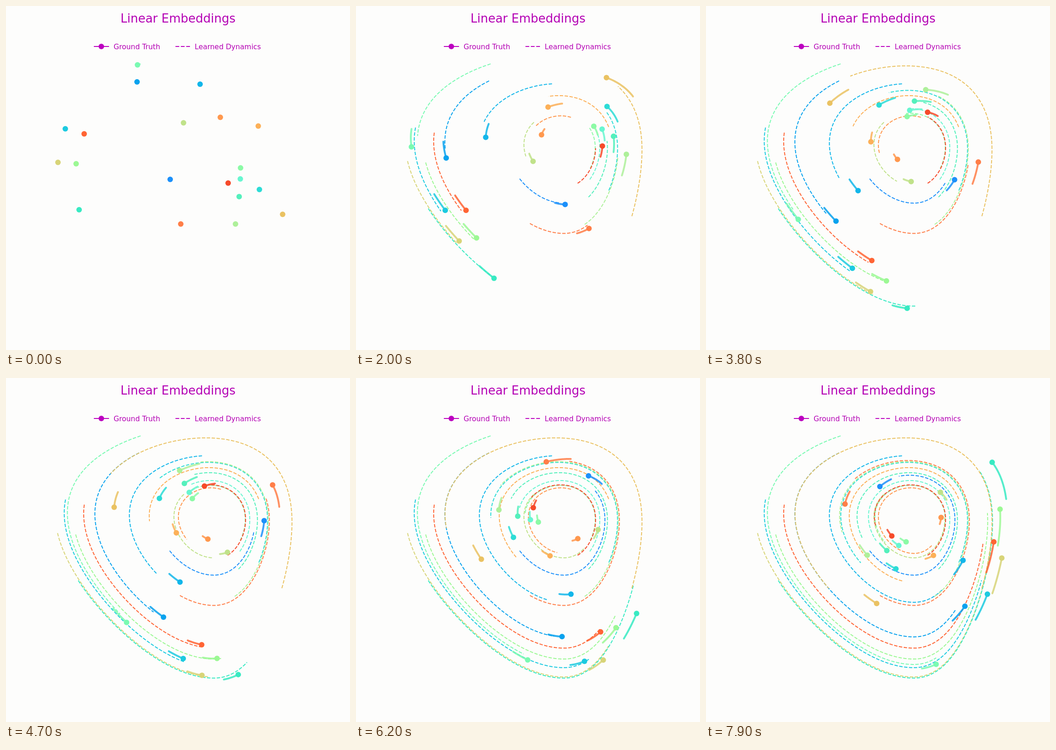
An HTML page with a canvas for the animation above (8000 ms loop, 748 by 748 pixels).

```html
<!DOCTYPE html>
<html lang="en">
<head>
<meta charset="utf-8">
<title>Linear Embeddings</title>
<style>
  html, body { margin: 0; width: 100%; height: 100%; overflow: hidden; background: #fdfdfc; }
  canvas, svg { position: absolute; left: 0; top: 0; width: 748px; height: 748px; }
  text { font-family: "DejaVu Sans", Verdana, sans-serif; font-size: 15.5px; fill: #b400b4; }
  .title { font-size: 26px; text-anchor: middle; }
  .key { stroke: #bc00c0; stroke-width: 2.2; }
</style>
</head>
<body>
<canvas id="stage" width="748" height="748"></canvas>
<svg viewBox="0 0 748 748">
  <text class="title" x="374" y="35.5">Linear Embeddings</text>
  <path class="key" d="M191 88H224"/>
  <circle cx="207.3" cy="88" r="6" fill="#bc00c0"/>
  <text x="234" y="93.5">Ground Truth</text>
  <path class="key" d="M368.5 88H400" stroke-dasharray="8.2 3.5"/>
  <text x="410.3" y="93.5">Learned Dynamics</text>
</svg>
<script>
const LOOP = 8000, FRAME = 100;
const H = 0.01;      // integration step, s
const LEAD = 0.03;   // motion already done at time 0, s
const TAIL = 0.42;   // trail length, s

// start x, start y, colour
const particles = [
  [286, 128, '#7afab2'], [285, 165, '#08a2ee'], [422, 170, '#12b6ea'],
  [129, 267, '#1ccae0'], [170, 278, '#ff6434'], [113, 340, '#d8d478'],
  [152.5, 343, '#9cf894'], [159, 443, '#38eac2'], [386, 254, '#c0e28a'],
  [466, 242, '#ff984e'], [548.5, 261, '#fcb058'], [510, 352, '#8cfaa6'],
  [509.5, 376, '#68f6d0'], [483, 385, '#f64a2a'], [551, 399, '#2cdcd6'],
  [507, 414.5, '#54f0bc'], [357, 377, '#1c90fa'], [380, 474, '#ff7e48'],
  [499, 474, '#aef09a'], [601.5, 453, '#eac262']
];

// Predator-prey flow in log coordinates, slightly damped
function truth(x, y) {
  return [
    80 * (1 - Math.exp((297 - y) / 125)) - 0.02 * (x - 458),
    108 * (1 - Math.exp((x - 462) / 175)) - 0.02 * (y - 297)
  ];
}

// The fitted flow: a weaker field, pulled inward at the lower right
function learned(x, y) {
  const u = x - 452, w = y - 305;
  const corner = Math.max(0, u) * Math.max(0, w);
  return [
    100 * (1 - Math.exp(-w / 185)) - 0.02 * u - 0.0006 * corner,
    117 * (1 - Math.exp(u / 210)) - 0.055 * Math.max(0, -w) - 0.001 * corner
  ];
}

function integrate(field, x, y) {
  const path = [[x, y]];
  for (let t = 0; t < LOOP / 1000 + LEAD; t += H) {
    const a = field(x, y);
    const b = field(x + a[0] * H / 2, y + a[1] * H / 2);
    x += b[0] * H;
    y += b[1] * H;
    path.push([x, y]);
  }
  return path;
}

const tracks = particles.map(([x, y, color]) => {
  const v = truth(x, y);
  const x0 = x - v[0] * LEAD, y0 = y - v[1] * LEAD;
  return { color, dot: integrate(truth, x0, y0), fit: integrate(learned, x0, y0) };
});

const ctx = document.getElementById('stage').getContext('2d');

function line(path, from, to) {
  ctx.beginPath();
  for (let i = from; i <= to; i++) ctx.lineTo(path[i][0], path[i][1]);
  ctx.stroke();
}

function draw(ms) {
  const now = Math.round((ms / 1000 + LEAD) / H);
  const tail = Math.max(0, now - Math.round(TAIL / H));
  ctx.clearRect(0, 0, 748, 748);

  ctx.lineWidth = 2;
  ctx.lineCap = 'butt';
  ctx.setLineDash([7.4, 3.2]);
  for (const p of tracks) {
    ctx.strokeStyle = p.color;
    line(p.fit, 0, now);
  }

  ctx.setLineDash([]);
  ctx.lineWidth = 4;
  ctx.lineCap = 'round';
  for (const p of tracks) {
    ctx.strokeStyle = ctx.fillStyle = p.color;
    ctx.globalAlpha = 0.85;
    if (now - tail > LEAD / H) line(p.dot, tail, now);
    ctx.globalAlpha = 1;
    ctx.beginPath();
    ctx.arc(p.dot[now][0], p.dot[now][1], 6, 0, 2 * Math.PI);
    ctx.fill();
  }
}

const begin = performance.now();
function tick() {
  const t = (performance.now() - begin) % LOOP;
  draw(Math.floor(t / FRAME) * FRAME);
  requestAnimationFrame(tick);
}
tick();
</script>
</body>
</html>
```
